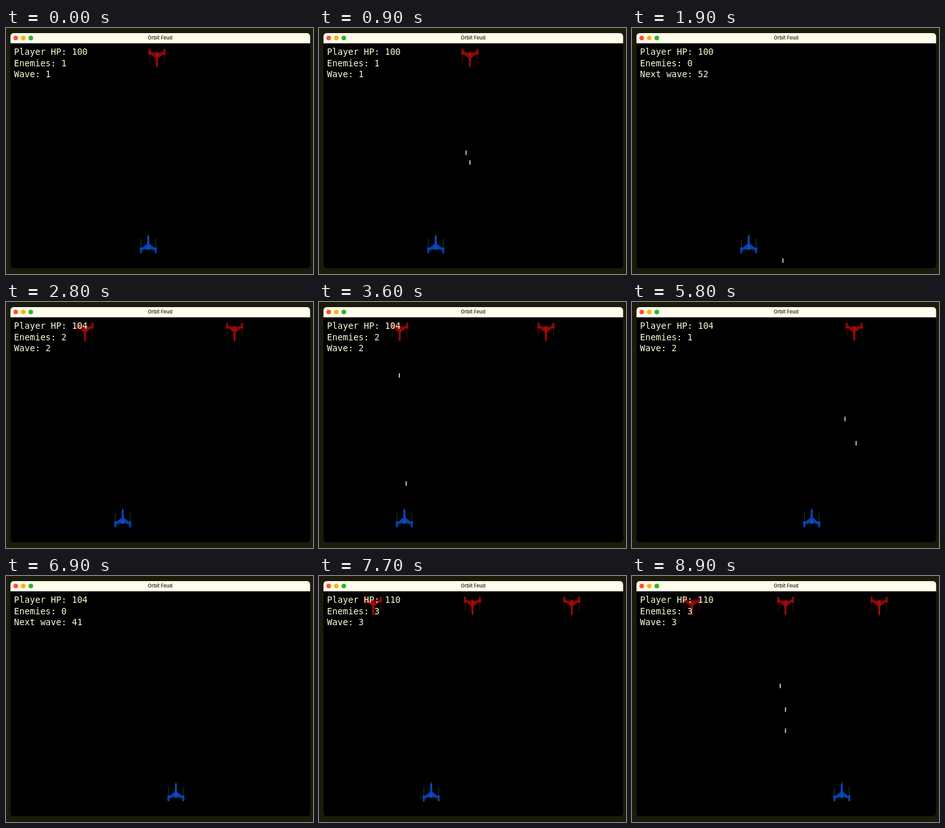
An HTML page with a canvas that plays this animation: 480x385 px, repeating every 9 s.

```html
<!DOCTYPE html>
<html lang="en">
<head>
<meta charset="utf-8">
<title>Orbit Feud</title>
<style>
  html, body { margin: 0; width: 100%; height: 100%; overflow: hidden; background: #1c1a0a; }
  canvas { display: block; width: 480px; height: 385px; }
</style>
</head>
<body>
<canvas id="stage" width="480" height="385"></canvas>
<script>
const ctx = document.getElementById('stage').getContext('2d');
const LOOP = 9000, STEP = 100;
const SPEED = 0.1535;                 // player and shots, px per ms
const PLAYER_Y = 338, ENEMY_Y = 47;
const MUZZLE = 38, HIT_Y = 62, PAUSE = 1000;
const CREAM = '#fbfbd6';
const BLUE = { main: '#0a50cc', dark: '#062a6c', gun: '#0a4440' };
const RED = { main: '#ad0c0c', dark: '#520406', gun: '#520606' };

// The player leaves at each time for a new x, at constant speed.
const moves = [
  [90, 230], [500, 182.5], [2850, 136.3], [3520, 133.5],
  [3617, 333], [5150, 281], [6800, 175.5], [7700, 328]
];

function playerX(t) {
  let x = 222.5;
  moves.forEach(([leave, goal], i) => {
    const until = Math.min(t, i + 1 < moves.length ? moves[i + 1][0] : LOOP);
    const reach = Math.max(0, until - leave) * SPEED;
    x += Math.sign(goal - x) * Math.min(reach, Math.abs(goal - x));
  });
  return x;
}

// Player shots; the first three each destroy an enemy.
const playerFire = [217, 3496, 5038, 8066];
const hits = playerFire.slice(0, 3)
  .map(t => t + (PLAYER_Y - MUZZLE - HIT_Y) / SPEED);

// Wave n holds n evenly spaced enemies that drift inwards.
const waves = [
  { start: 0, mid: 236, drift: 0, deaths: [hits[0]] },
  { start: hits[0] + PAUSE, mid: 240.5, drift: 0.0033, deaths: [hits[1], hits[2]] },
  { start: hits[2] + PAUSE, mid: 240, drift: 0.0073, deaths: [LOOP, LOOP, LOOP] }
];

const enemies = waves.flatMap(({ start, mid, drift, deaths }) =>
  deaths.map((dies, i) => {
    const offset = 468 * ((i + 0.5) / deaths.length - 0.5);
    return {
      start, dies,
      x: t => mid + offset - Math.sign(offset) * drift * (t - start)
    };
  }));

// Enemy shots: [enemy index, time]
const enemyFire = [[0, 82], [1, 3405], [2, 4914], [4, 7877], [4, 8092]];

const shots = [
  ...playerFire.map((t, i) => (
    { x: playerX(t), y: PLAYER_Y - MUZZLE, dir: -1, start: t, end: hits[i] || LOOP })),
  ...enemyFire.map(([i, t]) => (
    { x: enemies[i].x(t), y: ENEMY_Y + MUZZLE, dir: 1, start: t, end: t + 285 / SPEED }))
];

function rect(color, x, y, w, h) {
  ctx.fillStyle = color;
  ctx.fillRect(x, y, w, h);
}

function shape(color, points) {
  ctx.fillStyle = color;
  ctx.beginPath();
  points.forEach(([x, y]) => ctx.lineTo(x, y));
  ctx.fill();
}

function ship(x, y, flip, c) {
  ctx.save();
  ctx.translate(x, y);
  ctx.scale(1, flip);
  for (const side of [-1, 1]) {
    ctx.save();
    ctx.scale(side, 1);
    rect(c.gun, 11, -8, 1, 14);
    shape(c.main, [[0, -1], [3, 1], [10, 6], [10, 10], [5, 8], [0, 9]]);
    for (let i = 2; i < 10; i += 2) rect(c.dark, i, 1 + i / 2, 0.8, 7);
    shape(c.main, [[10, 6], [12.5, 5], [13.3, 7], [13, 14], [11.5, 15], [10, 13]]);
    rect(c.dark, 11, 8, 1, 5);
    ctx.restore();
  }
  shape(c.main, [[0, -16], [1.4, -11], [2, 3], [1, 9], [-1, 9], [-2, 3], [-1.4, -11]]);
  for (let i = -8; i < 4; i += 3) rect(c.dark, -1, i, 2, 1.2);
  ctx.restore();
}

function drawWindow() {
  rect('#1c1a0a', 0, 0, 480, 385);
  ctx.save();
  ctx.beginPath();
  ctx.roundRect(7, 8, 468.5, 368, 5);
  ctx.clip();
  rect('#000', 7, 8, 469, 368);
  rect('#fffdec', 7, 8, 469, 16);
  ctx.restore();
  ['#ff5038', '#ffb300', '#2db52d'].forEach((color, i) => {
    ctx.fillStyle = color;
    ctx.beginPath();
    ctx.arc(15.2 + 11.8 * i, 15.7, 3.6, 0, 7);
    ctx.fill();
  });
  ctx.fillStyle = '#353320';
  ctx.font = '600 7.6px Inter, sans-serif';
  ctx.textAlign = 'center';
  ctx.fillText('Orbit Feud', 241, 18.4);
}

function drawShots(t) {
  for (const s of shots) {
    if (t < s.start || t >= s.end) continue;
    rect(CREAM, s.x - 0.7, s.y + s.dir * SPEED * (t - s.start) - 3.5, 1.4, 7);
  }
}

function drawHud(t, count) {
  const n = waves.filter(w => t >= w.start).length;
  const clear = Math.max(...waves[n - 1].deaths);
  const status = t < clear
    ? 'Wave: ' + n
    : 'Next wave: ' + Math.round(60 * (1 - (t - clear) / PAUSE));
  ctx.fillStyle = CREAM;
  ctx.font = '13.65px "DejaVu Sans Mono", monospace';
  ctx.textAlign = 'left';
  ['Player HP: ' + (98 + n * (n + 1)), 'Enemies: ' + count, status]
    .forEach((line, i) => ctx.fillText(line, 12.6, 42 + 17.5 * i));
}

function draw(t) {
  drawWindow();
  const alive = enemies.filter(e => t >= e.start && t < e.dies);
  alive.forEach(e => ship(e.x(t), ENEMY_Y, -1, RED));
  ship(playerX(t), PLAYER_Y, 1, BLUE);
  drawShots(t);
  drawHud(t, alive.length);
}

const begin = performance.now();
function tick() {
  const t = (performance.now() - begin) % LOOP;
  draw(Math.floor(t / STEP) * STEP);
  requestAnimationFrame(tick);
}
tick();
</script>
</body>
</html>
```
